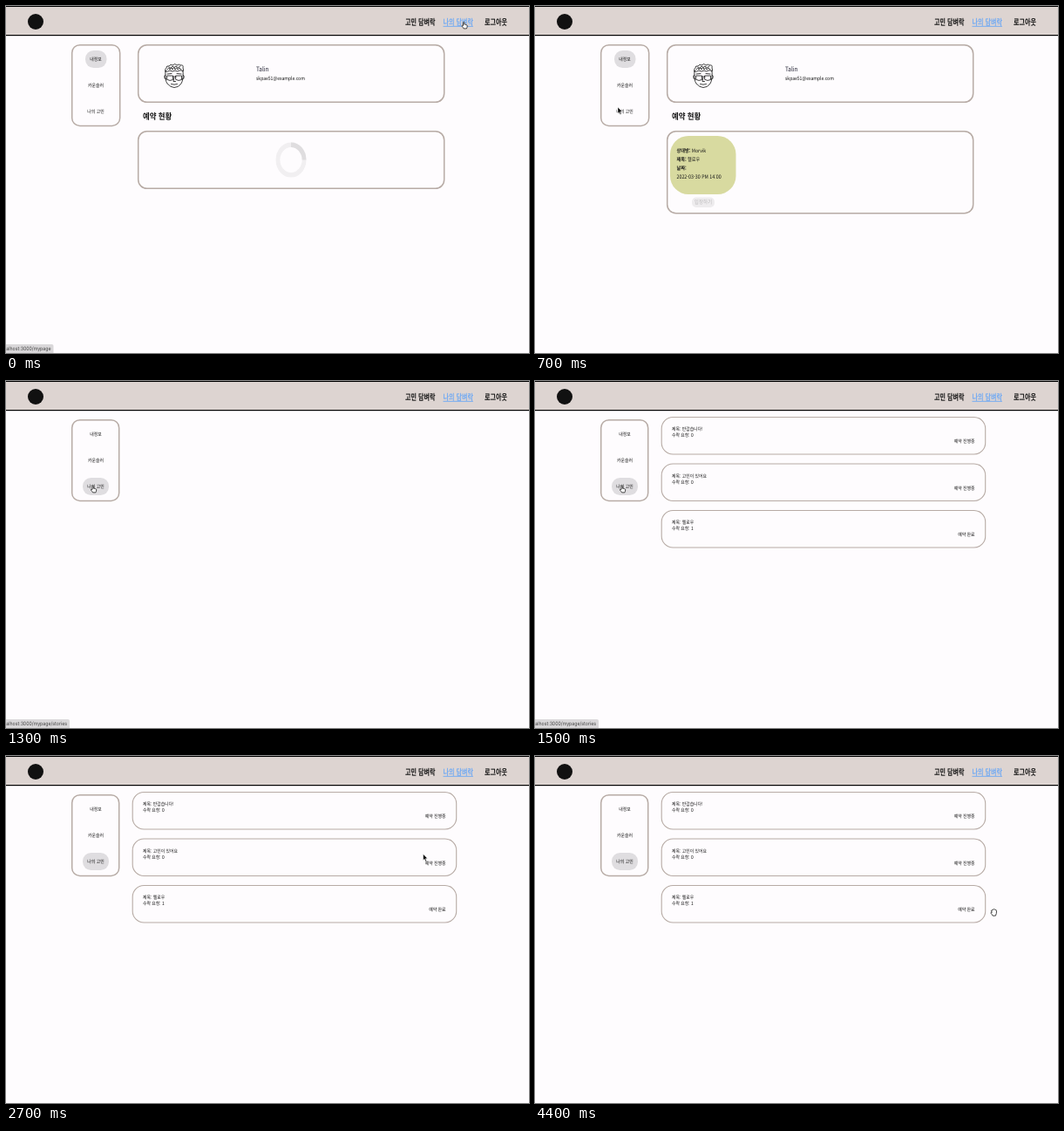
Recreate the animation shown at these times as an HTML page. Size 600x398 px, loop 4500 ms.

```html
<!DOCTYPE html>
<html lang="ko">
<meta charset="utf-8">
<title>My page</title>
<style>
html, body { margin: 0; width: 100%; height: 100%; overflow: hidden; background: #fefcfe }
svg { display: block; font-family: "Noto Sans CJK KR", "Noto Sans CJK", sans-serif; font-weight: 500; text-rendering: geometricPrecision }
.b { font-weight: 700 }
.nav { font-weight: 900 }
.mid { text-anchor: middle }
.end { text-anchor: end }
.url { font: 400 6px Inter, sans-serif; fill: #444 }
.box { fill: none; stroke: #b7aba5; stroke-width: 1.5 }
.line { fill: none; stroke: #111; stroke-width: .8; stroke-linecap: round; stroke-linejoin: round }
</style>
<svg id="stage" width="600" height="398" viewBox="0 0 600 398"></svg>
<script>
const LOOP = 4500, STEP = 100;
const stage = document.getElementById('stage');

// The whole screen is slightly narrowed, so text shares one squeeze factor.
const text = (x, y, size, str, cls = '', fill = '#151515', squeeze = .87) =>
  `<text transform="translate(${x} ${y}) scale(${squeeze} 1)" font-size="${size}" class="${cls}" fill="${fill}">${str}</text>`;
const rect = (x, y, w, h, r, attrs) =>
  `<rect x="${x}" y="${y}" width="${w}" height="${h}" rx="${r}" ${attrs}/>`;
const box = (x, y, w, h, r, extra = '') => rect(x, y, w, h, r, 'class="box" ' + extra);
const group = (id, body) => `<g id="${id}">${body}</g>`;
const nav = (x, str, fill) => text(x, 21.8, 9.8, str, 'nav', fill, .72);
const pill = (x, y, w) => rect(x, y, w, 20, 9.5, 'fill="#dfdde0"');
const status = (id, w, path) => group(id,
  rect(-5, 388, w + 5, 15, 2, 'fill="#d9d7d9"') + text(w - 3, 395.4, 6, 'localhost:3000/' + path, 'url end'));

const avatar = `<g class="line">
  <path d="M183 74Q182 85 185 89Q189 93.5 193 93.5Q198 93.5 201 89Q204 84 203 74M183 79q-2 0 -1 4l2 1M203 79q2 0 1 4l-2 1"/>
  <path d="M185 80h6.5v4.5q-3.5 2 -6.5 0zM195 80h6.5v4.5q-3.5 2 -6.5 0zM191.500 81h3.500M185 78l5 -.5M196 77.500l5 .5M193 82l-1 4.500h2.500M189.500 89.500q3.500 1.500 7 0"/>
  <path d="M183 75q-1-3 1-4q0-3 3-2q2-3 4-1q3-3 5 0q3-2 4 0q4-1 3 3q1 2 0 4q-2-2-4-1q-3 2-5 0q-3 2-6 0q-3 2-5 1zM185 73q2-4 3 0q2-4 3 0q2-5 3 0q2-4 3 0q2-4 4 0M187 70q2 3 4-1q2 3 4 0q2 3 5 0"/>
</g>`;

const booking = rect(155, 149, 75.5, 67, 21, 'fill="#d8daa0"') +
  text(162.500, 168, 5.9, '<tspan class="b">상대방:</tspan> Morvik') +
  text(162.500, 178, 5.9, '<tspan class="b">제목:</tspan> 헬로우') +
  text(162.500, 188, 5.9, '날짜:', 'b') +
  text(162.500, 198, 6.1, '2022-03-30 PM 14:00') +
  rect(180, 219.5, 26, 11.5, 5, 'fill="#eeecee"') +
  text(193, 227.4, 6.4, '입장하기', 'mid', '#bdbbbd');

const story = ([title, count, state], i) => {
  const y = 41.5 + i * 53.5;
  return box(145.2, y, 371.5, 42.5, 13, 'style="stroke-width:1.1"') +
    text(157, y + 15.7, 5.6, '제목: ' + title) +
    text(157, y + 22.9, 5.6, '수락 요청: ' + count) +
    text(504.5, y + 29.9, 5.6, '예약 ' + state, 'end');
};

const spinner = `<g transform="translate(327 176.5) scale(.87 1)" fill="none" stroke-width="5.5">
  <circle r="17.3" stroke="#f1eff1"/><path id="arc" d="M0-17.3A17.3 17.3 0 0 1 17.3 0" stroke="#dfdddf"/></g>`;

const hand = 'M2 4.500V1.200Q2 .3 2.700.3T3.400 1.200V3.200Q4.100 2.700 4.600 3.500Q5.400 3 5.800 3.900Q6.700 3.700 6.700 4.700Q6.700 6.500 5.900 7.900H2.600Q1.900 6.600.5 5.100Q.2 4.200 1.100 4.200Z';
const openHand = 'M1.500 4.300L.6 2.600Q.8 1.600 1.700 2.200Q1.700.8 2.700 1.100Q3.300.1 4 1Q5 .5 5.300 1.600Q6.700 1.300 6.700 2.700Q6.900 5.700 5.600 8.200H2.300Q1.500 6.700.1 5.100Q.1 4 1.500 4.300Z';
const handShape = (id, d) => `<path id="${id}" d="${d}" fill="#fff" stroke="#222" stroke-width=".85" stroke-linejoin="round"/>`;

stage.innerHTML =
  rect(0, 0, 600, 34, 0, 'fill="#ddd4d1"') +
  rect(0, 0, 600, 1, 0, '') + rect(0, 33, 600, 1.2, 0, '') +
  '<circle cx="34" cy="18" r="9" fill="#111"/>' +
  nav(458, '고민 담벼락') +
  nav(501.5, '<tspan text-decoration="underline">나의 담벼락</tspan>', '#72aaf2') +
  nav(549, '로그아웃') +
  group('pillInfo', pill(91, 51, 24.5)) + group('pillStory', pill(88, 111, 30)) +
  ['내정보', '카운슬러', '나의 고민'].map((s, i) => text(103, 62.9 + i * 30, 5.6, s, 'mid')).join('') +
  `<rect id="side" class="box" x="75.700" y="44.700" width="55" height="92.700" rx="9"/>` +
  group('info',
    box(151.7, 44.7, 351, 65.6, 10) + avatar +
    text(287, 75, 7.4, 'Talin', '', '#223') +
    text(287, 84.5, 5.8, 'skpae51@example.com') +
    text(157, 129.8, 9.7, '예약 현황', 'b') +
    '<rect id="list" class="box" x="151.700" y="143.700" width="351" height="65.600" rx="10"/>' +
    group('loading', spinner) + group('booking', booking)) +
  group('stories', [['반갑습니다!', 0, '진행중'], ['고민이 있어요', 0, '진행중'], ['헬로우', 1, '완료']].map(story).join('')) +
  status('urlHome', 54.5, 'mypage') + status('urlStory', 73, 'mypage/stories') +
  group('cursor',
    '<path id="arrow" d="M0 0V7.200L1.600 5.800L2.800 8.500L4 8L2.800 5.300L4.900 5.100Z" fill="#000" stroke="#fff" stroke-width=".5"/>' +
    handShape('hand', hand) + handShape('openHand', openHand));

const el = id => document.getElementById(id);
const show = (id, on) => el(id).style.display = on ? '' : 'none';
const fade = (id, v) => el(id).style.opacity = v;

// time, x, y of the pointer
const path = [[0, 522.5, 18], [100, 522.5, 18], [600, 121, 113], [700, 95, 116], [800, 97, 120],
  [1900, 97, 120], [2400, 441, 109], [2500, 462, 94], [3100, 526, 165], [3200, 526.5, 178],
  [4300, 526.5, 178], [4400, 522.8, 175], [4500, 522.8, 175]];

function pointer(t) {
  const i = path.findIndex((p, n) => n && t <= p[0]);
  const [t0, x0, y0] = path[i - 1], [t1, x1, y1] = path[i];
  const u = (t - t0) / (t1 - t0), e = u * u * (3 - 2 * u);
  return [x0 + (x1 - x0) * e, y0 + (y1 - y0) * e];
}

function draw(now) {
  const t = Math.floor(now % LOOP / STEP) * STEP;
  const onStories = t >= 1300, loaded = t >= 300;
  const grab = t >= 4400, pointing = t <= 100 || t >= 800 && t < 2000;

  show('info', !onStories);
  show('stories', t >= 1400);
  show('pillInfo', !onStories);
  show('pillStory', t >= 800);
  show('loading', !loaded);
  show('booking', loaded);
  el('list').setAttribute('height', loaded ? 94 : 65.6);
  el('side').setAttribute('width', onStories ? 54 : 55);
  el('arc').setAttribute('transform', `rotate(${t * .36})`);

  fade('urlHome', t < 500 ? 1 : t < 600 ? .7 : 0);
  fade('urlStory', t < 900 || t >= 2500 ? 0 : t < 2400 ? 1 : .7);

  show('arrow', !grab && !pointing);
  show('hand', pointing);
  show('openHand', grab);
  el('cursor').setAttribute('transform', `translate(${pointer(t)})`);
}

const start = performance.now();
(function tick() {
  draw(performance.now() - start);
  requestAnimationFrame(tick);
})();
</script>
</html>
```
